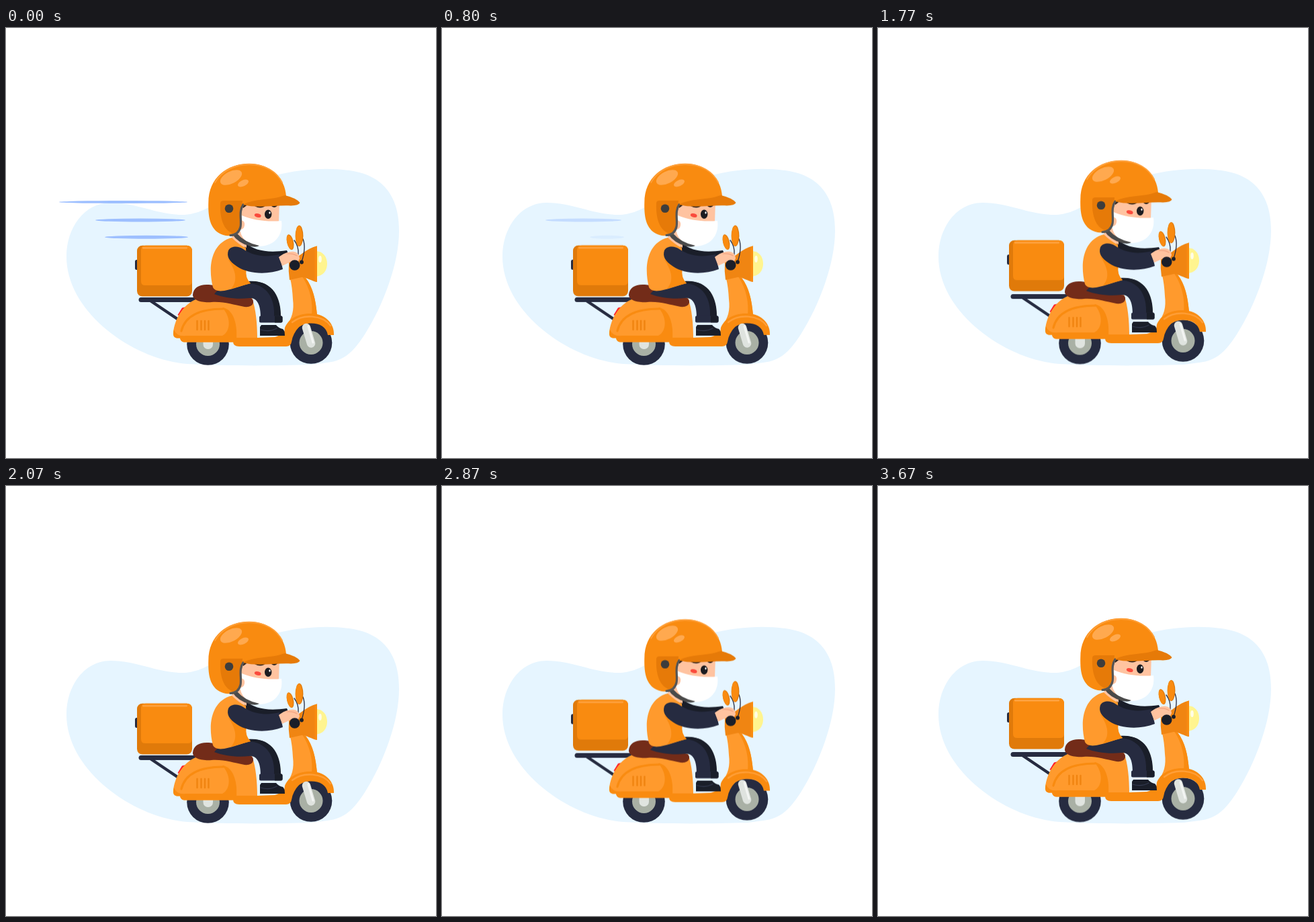
These frames come from a looping animation (640x640 px, 3830 ms). An HTML page without scripts:

```html
<!DOCTYPE html>
<html lang="en">
<head>
<meta charset="utf-8">
<title>Scooter delivery</title>
<style>
  @property --clock { syntax: "<number>"; inherits: true; initial-value: 0; }

  html, body { margin: 0; width: 100%; height: 100%; overflow: hidden; background: #fff; }
  svg { display: block; width: 100vw; height: 100vh; }

  .orange { fill: #f98b10; }
  .light { fill: #ff9a2d; }
  .deep { fill: #e07a0a; }
  .navy { fill: #262b40; }
  .ink { fill: #1a1e29; }
  .skin { fill: #ffc3a0; }
  .line { fill: none; stroke-linecap: round; stroke-linejoin: round; }

  /* Road bumps: each part rises by its own --rise */
  .bump { animation: bump 3830ms infinite; }
  @keyframes bump {
    0%, 3.34%, 20.05%, 36.76%, 53.47%, 70.18%, 86.89% {
      transform: translateY(0);
      animation-timing-function: cubic-bezier(.37, 0, .5, 1);
    }
    11.7%, 28.41%, 45.12%, 61.83%, 78.54%, 95.25%, 100% {
      transform: translateY(var(--rise));
      animation-timing-function: cubic-bezier(.5, 0, .63, 1);
    }
  }

  /* Speed lines shrink to their right end, each from its own --start (ms) */
  .streaks { fill: #9dbfff; animation: clock 3830ms linear infinite; }
  .streaks ellipse {
    --p: clamp(0, (var(--clock) - var(--start)) / 800, 1);
    opacity: calc(1 - var(--p));
    transform: scaleX(calc(1 - var(--p) * var(--p) * var(--p)));
    transform-box: fill-box;
    transform-origin: right;
  }
  @keyframes clock { from { --clock: 0; } to { --clock: 3830; } }
</style>
</head>
<body>
<svg viewBox="0 0 640 640">
  <path fill="#e6f5ff" d="M90 340C90 298 116 260 156 260C194 260 226 278 262 278C306 278 326 240 402 219C440 209 490 206 526 215C568 226 585 258 585 302C585 350 562 412 534 456C518 481 503 496 478 498L455 501C400 503 320 503 270 500C190 494 90 424 90 340Z"/>

  <g class="streaks">
    <ellipse cx="174.5" cy="259" rx="95.5" ry="2" style="--start:0"/>
    <ellipse cx="200" cy="286" rx="67" ry="2.5" style="--start:370"/>
    <ellipse cx="209" cy="311.3" rx="62" ry="2.5" style="--start:130"/>
  </g>

  <!-- rear wheel -->
  <g class="bump" style="--rise:-1.5px">
    <circle class="navy" cx="300.5" cy="470.5" r="31.3"/>
    <circle fill="#a9b0a5" cx="300.5" cy="470.5" r="17.5"/>
    <rect fill="#e0e4e0" x="293.5" y="450" width="14.5" height="28" rx="7"/>
  </g>

  <!-- rack -->
  <g class="bump line" style="--rise:-5px" stroke="#262b40">
    <path d="M201 404.5H300" stroke-width="7"/>
    <path d="M215 406L258 435" stroke-width="4.5"/>
  </g>

  <!-- box -->
  <g class="bump" style="--rise:-8px">
    <rect class="navy" x="192" y="345" width="8" height="15" rx="2.5"/>
    <rect class="deep" x="195" y="323.7" width="82" height="75.8" rx="8"/>
    <path class="orange" d="M208 323.7H269Q277 323.7 277 331.7V377Q277 383 271 383H207Q201 383 201 377V330Q201 323.7 208 323.7Z"/>
    <path class="line" stroke="#ffa545" stroke-width="2.2" d="M204 327.3H269"/>
  </g>

  <!-- front wheel -->
  <g class="bump" style="--rise:-3.2px">
    <circle class="navy" cx="454" cy="468.5" r="31.3"/>
    <circle fill="#a9b0a5" cx="454" cy="468.5" r="17.5"/>
  </g>

  <!-- scooter -->
  <g class="bump" style="--rise:-5px">
    <path fill="#ff1f28" d="M262 416.5L268 415L261 431L255.5 427Z"/>
    <path class="light" d="M249 453C251 434 263 410 287 402H366C372 418 374 440 374 463L338 467.5H265Q260 467 259 461.5H254Q248 460 249 453Z"/>
    <path class="orange" d="M249 453L250 449Q254 460 268 458H322C334 452 336 432 322 416C338 418 345 440 343 464L338 467.5H265Q260 467 259 461.5H254Q248 460 249 453Z"/>
    <path class="line" stroke="#f98b10" stroke-width="3.2" d="M261 451C266 430 285 418 324 418"/>
    <path class="line" stroke="#f08410" stroke-width="2.4" d="M284.5 436V449M290.5 436V449M296 436V449M301.5 436V449"/>
    <path fill="#732c19" d="M278 397C279 386 288 381 302 382L340 387L362 401Q369 403 368 409Q366 416 355 415C337 412 326 407 306 408C292 409 278 406 278 397Z"/>

    <path class="orange" d="M338 461H374L400 460C414 457 425 442 427 424L460 420L458 430C440 438 428 450 425 467Q424 474 417 474H347Q338 474 338 467Z"/>
    <path class="light" d="M423 373Q434 366 446 372C457 386 461 405 463 427L440 437L417 443C426 432 429 420 427 404Q426 385 423 373Z"/>
    <path class="orange" d="M446 372C457 386 461 405 463 427L455 428C457 409 453 388 441 370Z"/>

    <path fill="#fff48f" d="M461 332C472 332 478 341 478 351S472 369 461 370Z"/>
    <ellipse cx="467.5" cy="344" rx="2.3" ry="5" fill="#fffde6"/>
    <path fill="#f08512" d="M421 348C437 341 446 328 463 324.5V378C455 377 448 371 440 371L422 375Q420 362 421 348Z"/>
    <path class="orange" d="M459.5 325.5L463 324.5V378L459.5 377Z"/>

    <path class="orange" d="M415 446C421 431 438 424 457 425C477 427 489 441 488 457H479C477 445 467 439.5 454 439.5C439 439.5 427 449 423 466L412 470Z"/>
    <path class="line" stroke="#ff9f38" stroke-width="2.4" d="M426 438C442 425 471 427 483 443"/>
  </g>

  <!-- fork -->
  <g class="bump line" style="--rise:-3.5px">
    <path stroke="#dfe3df" stroke-width="12.5" d="M447 446L454 469.5"/>
    <path stroke="#f3f5f3" stroke-width="3" d="M450 444L457 468"/>
  </g>

  <!-- rider -->
  <g class="bump" style="--rise:-5px">
    <path class="ink" d="M356 319C370 332 390 335 418 331L421 338C390 345 370 344 354 335Z"/>

    <path class="navy" d="M310 396C320 383 340 378 366 377C395 377 408 398 409 431H379C379 412 374 401 362 402C345 404 325 402 310 396Z"/>
    <path class="ink" d="M360 377C396 374 410 400 409 431H399C401 402 388 381 360 380Z"/>
    <rect class="navy" x="377" y="428.5" width="34.5" height="10" rx="2"/>
    <path class="ink" d="M400 428.5H409.5Q411.5 428.5 411.5 431V436Q411.5 438.5 409 438.5H400Z"/>
    <path class="ink" d="M380 442H402Q406 447 412 448Q415 450 415 458H378V445Z"/>
    <path class="line" stroke="#343a50" stroke-width="1.2" d="M379 449Q392 453 403 447"/>

    <path class="skin" d="M337 303H358V327L336 316Z"/>
    <path class="light" d="M336 312C306 320 300 354 308 386Q311 393 325 391C340 388 352 383 364 380Q354 371 358 350L357 327Q346 322 336 312Z"/>
    <path class="orange" d="M331 345L358 358Q355 372 364 380L335 388C347 375 340 358 331 345Z"/>
    <path class="navy" d="M331 331C335 324 346 324 353 329C371 341 388 341 407 337L412 359C389 368 360 366 344 355C332 347 328 340 331 331Z"/>

    <!-- handlebar and mirrors -->
    <path class="line" stroke="#262b40" stroke-width="1.3" d="M442 314Q447 327 440 348M429 316Q436 325 435 337"/>
    <g class="deep">
      <ellipse cx="423" cy="318.7" rx="4.9" ry="11.7" transform="rotate(-13 423 318.7)"/>
      <ellipse cx="436.5" cy="309.5" rx="5.9" ry="15.7"/>
    </g>
    <g class="orange">
      <ellipse cx="422.5" cy="318.7" rx="4.1" ry="11" transform="rotate(-13 422.5 318.7)"/>
      <ellipse cx="436" cy="309.5" rx="5" ry="15"/>
    </g>
    <path class="skin" d="M406 341C413 336 420 332 429 333Q436 334 437 343L434 349L424 348L411 354Z"/>
    <path class="line" stroke="#f2a381" stroke-width="1.2" d="M418 336Q427 335 433 339"/>
    <circle class="ink" cx="429.7" cy="353" r="7.8"/>
    <circle class="ink" cx="440" cy="348.5" r="2.9"/>

    <!-- face -->
    <path class="skin" d="M349 257H407L406 290L352 300Z"/>
    <path fill="#2b2320" d="M351 262H361L353 268ZM370 263H388Q380 271 370 265ZM395 263H405Q400 270 395 265Z"/>
    <path fill="#fff" d="M351 279C368 286 389 289 410 287C413 309 399 326 374 325C358 322 345 309 350 294Z"/>
    <path class="skin" d="M350 286Q356 287 355 294Q354 300 348 300Z"/>
    <ellipse cx="374.7" cy="279" rx="5" ry="2.8" fill="#fa4a3c" transform="rotate(14 374.7 279)"/>
    <ellipse cx="390.2" cy="277.3" rx="5.2" ry="6.7" fill="#1c1c20"/>
    <ellipse cx="392.5" cy="275" rx="1.2" ry="1.8" fill="#fff"/>

    <!-- helmet -->
    <path fill="#4a4a4a" d="M336 306L343 305Q356 320 377 324Q373 327 364 325Q346 321 336 306Z"/>
    <path class="orange" d="M301.3 260C301.3 223 329 201.8 362 201.8C394 201.8 415.5 224 417 250L400 263H355C348 270 351 286 349 296C347 307 338 310.5 327 309C305 304 300.5 285 301.3 260Z"/>
    <path class="line" stroke="#ff9f38" stroke-width="2" d="M311 230C322 211 342 203 362 203C386 203 403 214 411 230"/>
    <path fill="#e67a08" d="M319 261Q319 257 324 257H352L348 296Q346 304 338 306C324 301 318 284 319 261Z"/>
    <path class="line" stroke="#555" stroke-width="3.2" d="M353 263C346 273 351 286 349 296Q346 308 334 308.5"/>
    <path fill="#e67a08" d="M353 263C370 253 394 257 415 249Q432 253 437.5 260Q436 264 424 264.5C404 263 374 269 353 263Z"/>
    <circle cx="332" cy="268.7" r="6.3" fill="#3d3d3d"/>
    <g fill="#ffa94f">
      <ellipse cx="335" cy="222.5" rx="17.5" ry="9" transform="rotate(-27 335 222.5)"/>
      <ellipse cx="353" cy="231" rx="8.6" ry="4.5" transform="rotate(-25 353 231)"/>
    </g>
  </g>
</svg>
</body>
</html>
```
